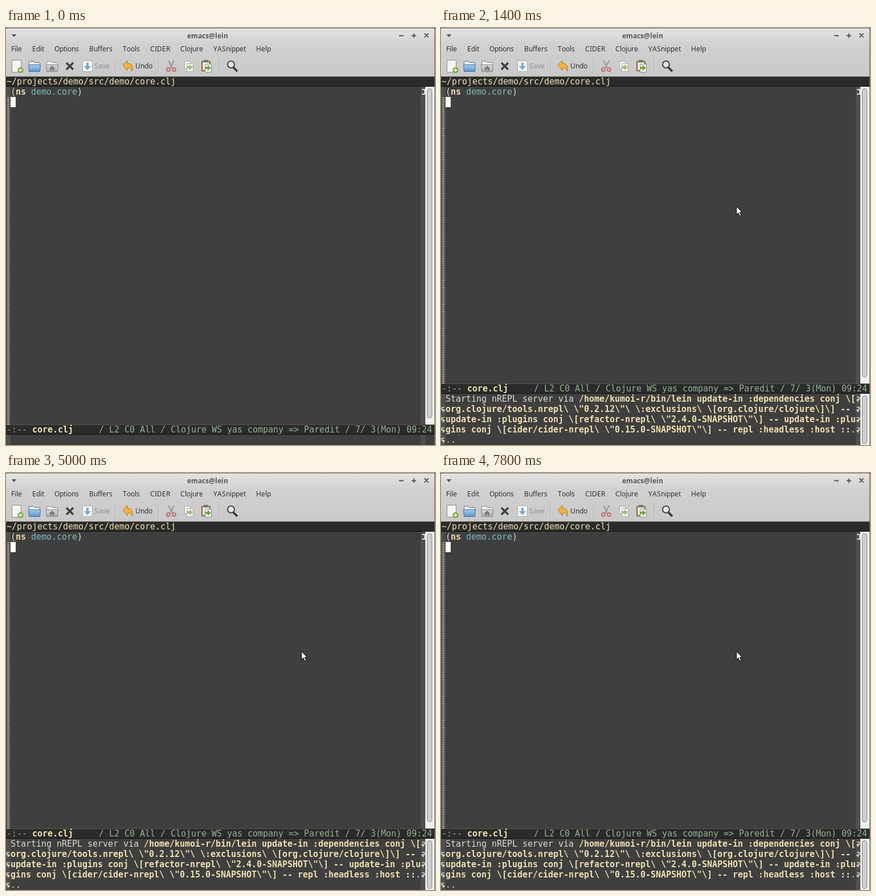
An HTML page with a canvas for the animation above (8000 ms loop, 753 by 732 pixels).

```html
<!DOCTYPE html>
<html lang="en">
<head>
<meta charset="utf-8">
<style>
html, body { margin: 0; width: 100%; height: 100%; overflow: hidden; background: #3f3f3f; }
canvas { display: block; }
</style>
</head>
<body>
<canvas id="stage" width="753" height="732"></canvas>
<script>
const ctx = document.getElementById('stage').getContext('2d');
const LOOP = 8000, LINE = 18;
const FG = '#dcdccc', YELLOW = '#f0dfaf', GREEN = '#8fb28f', TEAL = '#7cb8bb';
const BG = '#3f3f3f', BAR = '#2b2b2b', FRINGE = '#4f4f4f';

// Cursor visibility flips at each of these times.
const BLINKS = [400, 1300, 1800, 2300, 2700, 3200, 3600, 4100, 4600,
                5000, 5500, 5900, 6400, 6900, 7300, 7800];

const COMMAND = [
  '/home/kumoi-r/bin/lein update-in :dependencies conj \\[',
  'org.clojure/tools.nrepl\\ \\"0.2.12\\"\\ \\:exclusions\\ \\[org.clojure/clojure\\]\\] -- ',
  'update-in :plugins conj \\[refactor-nrepl\\ \\"2.4.0-SNAPSHOT\\"\\] -- update-in :plu',
  'gins conj \\[cider/cider-nrepl\\ \\"0.15.0-SNAPSHOT\\"\\] -- repl :headless :host ::'
];

function rect(x, y, w, h, color) {
  ctx.fillStyle = color;
  ctx.fillRect(x, y, w, h);
}

function shape(d, fill, stroke, width = 1) {
  const path = new Path2D(d);
  if (fill) { ctx.fillStyle = fill; ctx.fill(path); }
  if (stroke) { ctx.strokeStyle = stroke; ctx.lineWidth = width; ctx.stroke(path); }
}

function gradient(y0, y1, ...colors) {
  const g = ctx.createLinearGradient(0, y0, 0, y1);
  colors.forEach((c, i) => g.addColorStop(i / (colors.length - 1), c));
  return g;
}

// Sets text with whole-pixel advances, as hinted desktop text does; returns the end x.
function write(text, x, y, color, font) {
  ctx.font = font;
  ctx.fillStyle = color;
  for (const char of text) {
    ctx.fillText(char, x, y);
    x += Math.round(ctx.measureText(char).width);
  }
  return x;
}

function label(text, x, y, color = '#333', weight = '') {
  write(text, x, y, color, `${weight} 12px "Noto Sans", "Open Sans", sans-serif`);
}

// Draws [text, color, bold] runs one after another.
function mono(x, y, ...runs) {
  for (const [text, color, bold] of runs) {
    x = write(text, x, y, color, `${bold ? 'bold' : ''} 15px "DejaVu Sans Mono", monospace`);
  }
}

function drawTitleAndMenu() {
  rect(0, 0, 753, 27, gradient(0, 27, '#e4e4e4', '#d2d2d2'));
  rect(0, 27, 753, 58, gradient(27, 85, '#d1d1d1', '#c9c9c9'));
  rect(0, 0, 753, 1, '#8a8a8c');
  rect(0, 0, 2, 1, '#1c2a44');
  rect(751, 0, 2, 1, '#1c2a44');
  label('emacs@lein', 318, 18, '#5a5a5a', 'bold');
  shape('M9.5 11h9l-4.5 5z', '#555b66');
  shape('M690 13.5h8M712 13.5h8M716 9.5v8M734.5 9.5l7 7M741.5 9.5l-7 7', null, '#555', 1.8);

  const menus = { File: 9, Edit: 46, Options: 85, Buffers: 146, Tools: 205,
                  CIDER: 253, Clojure: 306, YASnippet: 364, Help: 439 };
  for (const name in menus) label(name, menus[name], 41);
}

function folder(x, light, dark, edge) {
  shape(`M${x + 1.5} 74v-14q0-1.500 1.500-1.500h6l2 2h8q1.500 0 1.500 1.500v12z`, '#eee', edge);
  shape(`M${x + .5} 64.500h21l-1 12h-19z`, gradient(64, 77, light, dark), edge);
}

function page(x, y, w, h, edge = '#888') {
  shape(`M${x} ${y}h${w}v${h}h${-w}z`, '#f4f4f0', edge);
}

function drawToolbar() {
  page(10.5, 56.5, 16, 21);
  ctx.beginPath();
  ctx.arc(25.5, 74, 5, 0, 7);
  ctx.fillStyle = '#6fa628';
  ctx.fill();
  shape('M22.500 74h6M25.500 71v6', null, '#fff', 2);

  folder(39, '#a8cdf0', '#5b92cc', '#4673a0');
  folder(70, '#d8d8d8', '#aaa', '#8a8a8a');
  shape('M76 71l5-5 5 5h-1.500v4h-2.500v-3h-2v3h-2.500v-4z', '#777');

  shape('M106 61l12 12M118 61l-12 12', null, '#3d4140', 3.5);

  page(134.5, 57.5, 17, 19, '#aaa');
  shape('M141 61h4v6h4l-6 7-6-7h4z', '#7ba9d4');
  label('Save', 155, 71, '#8f8f8f');

  shape('M205 65l8-8v5c8 0 11 6 8 14-.500-5-3-6-8-6v5z', '#f0b53c', '#b97b16');
  label('Undo', 227, 71);

  shape('M285 57l7 13M295 57l-7 13', null, '#999', 2.2);
  shape('M288 73a3 3 0 1 1-6 0a3 3 0 1 1 6 0M298 73a3 3 0 1 1-6 0a3 3 0 1 1 6 0',
        null, '#c46f6f', 2);

  page(313.5, 58.5, 10, 13, '#aaa');
  page(317.5, 62.5, 11, 14, '#aaa');
  shape('M318 67h4v-3l6 5-6 5v-3h-4z', '#9cbf75');

  shape('M343.500 58.500h15v17h-15z', '#c79a52', '#7c5517');
  page(345.5, 60.5, 11, 13, '#aaa');
  rect(347, 56, 8, 4, '#777');
  page(349.5, 63.5, 11, 14);
  shape('M350 68h4v-3l6 5-6 5v-3h-4z', '#72a83a');

  shape('M399 69l7 7', null, '#333', 3.5);
  shape('M401 64a6 6 0 1 1-12 0a6 6 0 1 1 12 0', '#e4e8ea', '#444', 2);

  for (const x of [192, 267, 374]) {
    rect(x, 53, 1, 28, '#b2b2b2');
    rect(x + 1, 53, 1, 28, '#dadada');
  }
}

function drawBar(y) {
  rect(0, y, 753, LINE, BAR);
  rect(0, y, 753, 1, '#5c5248');
  rect(0, y + LINE - 1, 753, 1, '#111');
}

function drawScrollbar(top, bottom, thumbTop, thumbBottom) {
  rect(736, top, 17, bottom - top, '#efefef');
  ctx.beginPath();
  ctx.roundRect(739.5, thumbTop + .5, 8, thumbBottom - thumbTop - 1, 4);
  ctx.fillStyle = '#d0d0d0';
  ctx.fill();
  ctx.strokeStyle = '#858585';
  ctx.lineWidth = 1;
  ctx.stroke();
}

function drawFringes(top, bottom) {
  rect(0, top, 8, bottom - top, FRINGE);
  rect(728, top, 8, bottom - top, FRINGE);
}

function drawEditor(bottom, cursorOn) {
  drawBar(85);
  mono(1, 99, ['~/projects/demo/src/demo/core.clj', YELLOW]);

  drawFringes(103, bottom);
  for (let y = 122; y < bottom; y += 3) rect(2, y, 4, 1, FG);
  shape('M730 108h5v8h-5', null, FG, 2);
  drawScrollbar(103, bottom, 106, bottom - 11);

  mono(8, 117, ['(', FG], ['ns', YELLOW, true], [' ', FG], ['demo.core', TEAL], [')', FG]);
  if (cursorOn) rect(8, 121, 9, LINE, '#ffffef');

  drawBar(bottom);
  mono(1, bottom + 14, ['-:-- ', GREEN], ['core.clj', YELLOW, true],
    ['     / L2 C0 All / Clojure WS yas company => Paredit / 7/ 3(Mon) 09:24', GREEN]);
}

function drawMessage() {
  drawFringes(642, 732);
  drawScrollbar(642, 732, 645, 730);
  COMMAND.forEach((text, i) => {
    const y = 656 + i * LINE;
    mono(8, y, [i ? '' : 'Starting nREPL server via ', FG], [text, YELLOW, true], [i == 3 ? '.' : '', FG]);
    // Wrapped-line arrows in both fringes.
    shape(`M730 ${y - 8}h4q2 3-1 5h-2M733 ${y - 5}l-3 2 3 3`, null, FG, 1.5);
    shape(`M6 ${y + 10}h-4q-2 3 1 5h2M3 ${y + 13}l3 2-3 3`, null, FG, 1.5);
  });
  mono(8, 728, ['..', FG]);
}

function drawPointer(t) {
  if (t < 100) return;
  const p = Math.min(4, Math.floor(t / 100) - 1) / 4;
  const ease = 1 - (1 - p) ** 1.6;
  ctx.save();
  ctx.translate(Math.round(613 - 95 * ease), Math.round(55 + 257 * ease));
  shape('M.500 1v14.500l3.300-3 2.500 5.500 2.600-1.100-2.500-5.200h4.300z', '#fff', '#000');
  ctx.restore();
}

function draw() {
  const t = performance.now() % LOOP;
  const expanded = t >= 1400;
  const cursorOn = BLINKS.filter(b => b <= t).length % 2 === 0;

  rect(0, 0, 753, 732, BG);
  drawTitleAndMenu();
  drawToolbar();
  drawEditor(expanded ? 624 : 696, cursorOn);
  if (expanded) {
    drawMessage();
  } else {
    drawFringes(714, 732);
    if (t >= 900) mono(8, 728, ['C-c-', FG]);
  }
  rect(752, 1, 1, 731, '#6a6a6a');
  drawPointer(t);
  requestAnimationFrame(draw);
}
draw();
</script>
</body>
</html>
```
